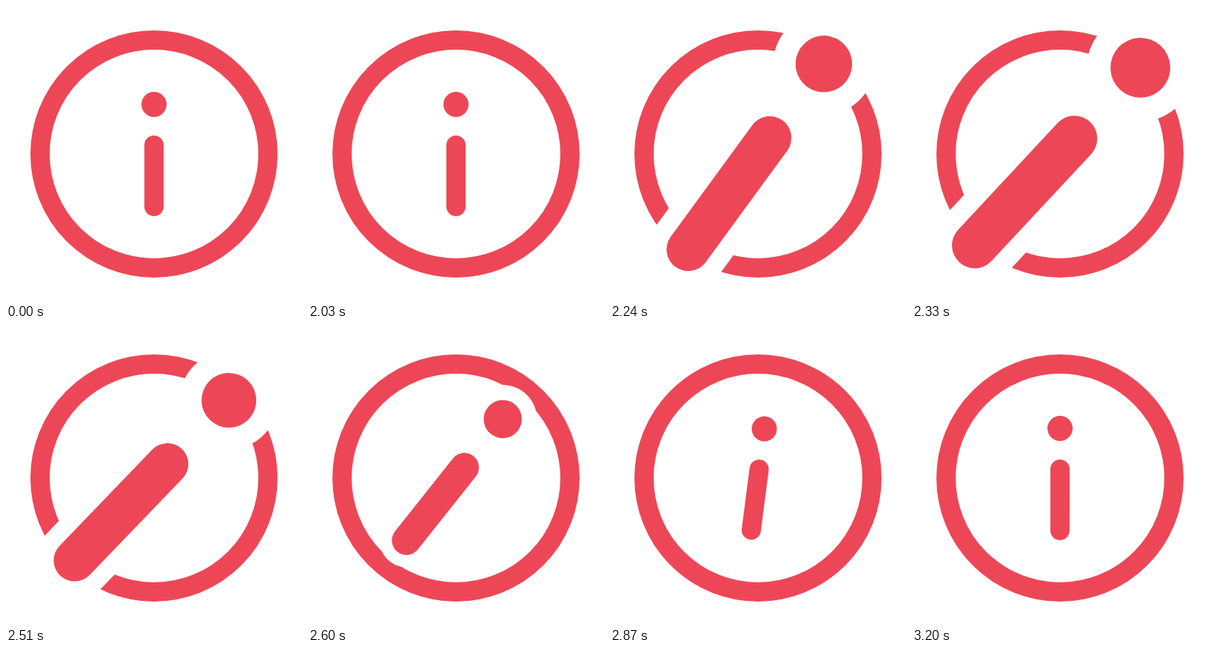
These frames come from a looping animation (400x400 px, 3230 ms). An HTML page:

```html
<!DOCTYPE html>
<html lang="en">
<head>
<meta charset="utf-8">
<title>Info icon</title>
<style>
  html, body { margin: 0; height: 100%; overflow: hidden; background: #fff; }
  svg { display: block; width: 100vw; height: 100vh; }
</style>
</head>
<body>
<svg viewBox="-200 -200 400 400">
  <circle r="154" fill="none" stroke="#ed4757" stroke-width="26"/>
  <g id="letter" stroke-linecap="round">
    <g fill="#fff" stroke="#fff">
      <circle cy="-67" r="30.5" stroke="none"/>
      <path d="M0-12V71" stroke-width="48"/>
    </g>
    <g fill="#ed4757" stroke="#ed4757">
      <circle cy="-67" r="17" stroke="none"/>
      <path d="M0-12V71" stroke-width="26"/>
    </g>
  </g>
</svg>
<script>
const LOOP = 3230, START = 2030, STEP = 30, PEAK = 400;
const letter = document.getElementById('letter');

// Cubic Bézier easing, solved by bisection
const bezier = (x1, y1, x2, y2) => x => {
  if (x <= 0) return 0;
  if (x >= 1) return 1;
  const curve = (a, b, t) => 3 * (1 - t) * t * ((1 - t) * a + t * b) + t ** 3;
  let low = 0, high = 1;
  for (let i = 0; i < 24; i++) {
    const mid = (low + high) / 2;
    if (curve(x1, x2, mid) < x) low = mid; else high = mid;
  }
  return curve(y1, y2, low);
};

const grow = x => 1 - (1 - Math.min(x, 1)) ** 3;
const shrink = bezier(.34, 0, .28, 1);
const tilt = bezier(.255, 0, .26, 1);
const untilt = bezier(.42, 0, .18, 1);

function draw(now) {
  const elapsed = now % LOOP - START;
  const t = Math.max(0, Math.floor(elapsed / STEP) * STEP);
  const scale = 1 + 1.4 * (grow(t / PEAK) - shrink((t - PEAK) / 400));
  const angle = 45 * (tilt(t / PEAK) - untilt((t - PEAK) / 800));
  letter.setAttribute('transform', `rotate(${angle}) scale(${scale})`);
}

const origin = performance.now();
function tick() {
  draw(performance.now() - origin);
  requestAnimationFrame(tick);
}
tick();
</script>
</body>
</html>
```
